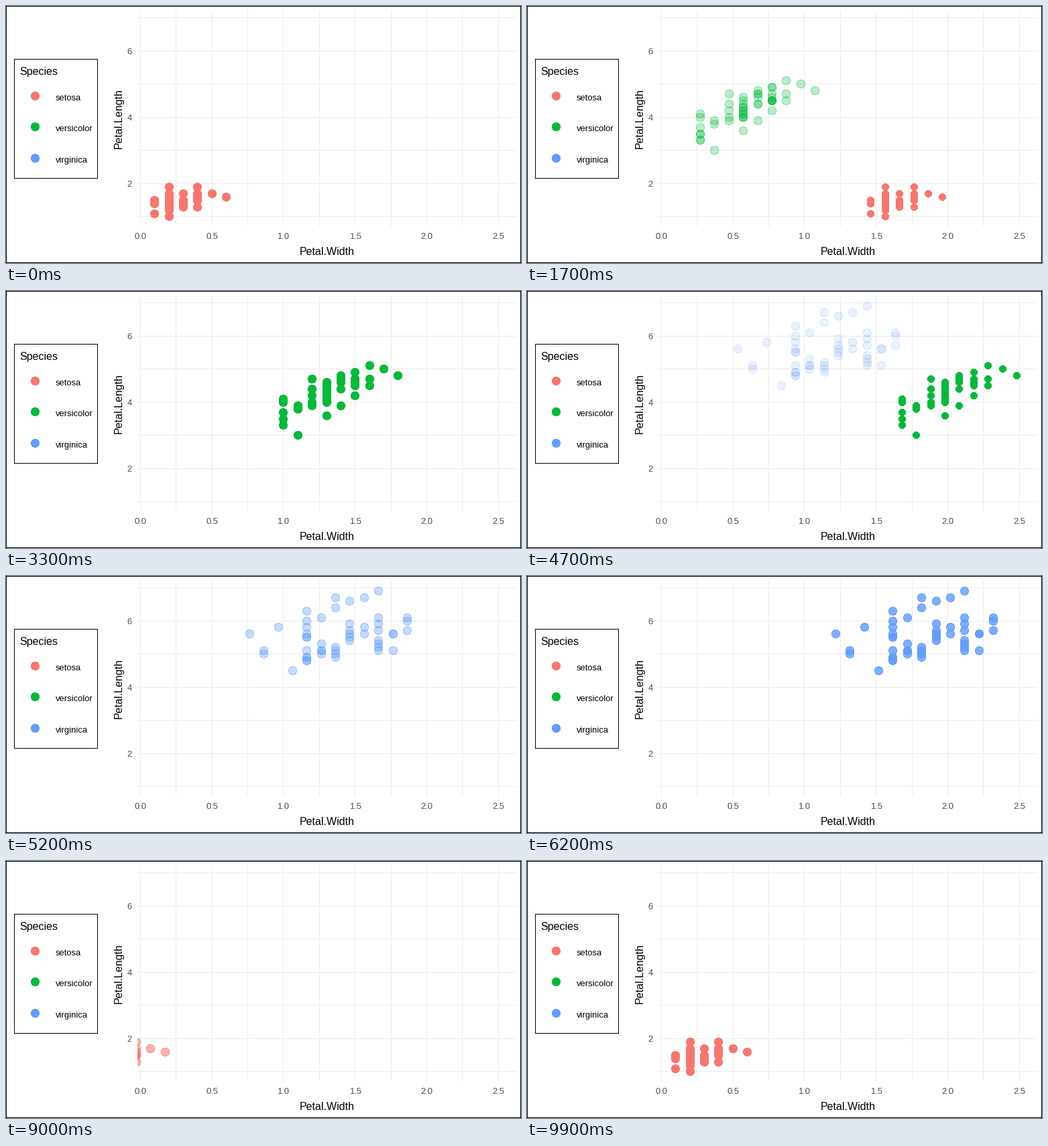
Animation of 768 by 384 pixels, one loop 10000 ms. Source, as a matplotlib script:

```python
import math

import matplotlib.pyplot as plt
import numpy as np
from matplotlib.animation import FuncAnimation
from matplotlib.collections import PathCollection
from matplotlib.patches import Rectangle
from matplotlib.path import Path
from matplotlib.transforms import IdentityTransform

WIDTH, HEIGHT = 768, 384
LEFT, TOP, RIGHT, BOTTOM = 196, 7, 761, 329
X_ZERO, X_UNIT = 200.4, 213.55
Y_TWO, Y_UNIT = 265.4, 49.59

# Petal widths mapped to petal lengths, both in millimetres.
SETOSA = {
    1: [11] + [14] * 2 + [15] * 2,
    2: [10] + [12] * 2 + [13] * 4 + [14] * 8 + [15] * 7 + [16] * 5 + [17, 19],
    3: [13] * 2 + [14] * 3 + [15, 17],
    4: [13] + [15] * 3 + [16, 17, 19],
    5: [17],
    6: [16],
}
VERSICOLOR = {
    10: [33] * 2 + [35] * 2 + [37, 40, 41],
    11: [30, 38, 39],
    12: [39, 40, 42, 44, 47],
    13: [36] + [40] * 3 + [41] * 2 + [42] * 2 + [43] * 2 + [44, 45, 46],
    14: [39] + [44] * 2 + [46] + [47] * 2 + [48],
    15: [42] + [45] * 5 + [46, 47] + [49] * 2,
    16: [45, 47, 51],
    17: [50],
    18: [48],
}
VIRGINICA = {
    14: [56],
    15: [50, 51],
    16: [58],
    17: [45],
    18: [48] * 2 + [49] * 2 + [51] + [55] * 2 + [56, 58, 60, 63],
    19: [50] + [51] * 2 + [53, 61],
    20: [49, 50, 51, 52, 64, 67],
    21: [54, 55, 56, 57, 59, 66],
    22: [56, 58, 67],
    23: [51, 52, 53, 54, 57, 59, 61, 69],
    24: [51] + [56] * 2,
    25: [57, 60, 61],
}
SPECIES = [
    ("setosa", "#F8766D", SETOSA),
    ("versicolor", "#00BA38", VERSICOLOR),
    ("virginica", "#619CFF", VIRGINICA),
]
# Start of the tween, first moving frame, last frame.
TRANSITIONS = [(11, 12, 33), (44, 46, 66), (78, 79, 99)]

plt.rcParams["font.family"] = "Liberation Sans"
fig = plt.figure(figsize=(WIDTH / 72, HEIGHT / 72), dpi=72, facecolor="white")
ax = fig.add_axes([0, 0, 1, 1])
ax.set(xlim=(0, WIDTH), ylim=(HEIGHT, 0))
ax.axis("off")


def to_x(value):
    return np.floor(X_ZERO + X_UNIT * value)


def to_y(value):
    return np.floor(Y_TWO - Y_UNIT * (value - 2))


def box(x, y, w, h, color):
    ax.add_patch(Rectangle((x, y), w, h, lw=0, color=color, antialiased=False))


def frame_box(x, y, w, h):
    box(x, y, w, h, "black")
    box(x + 1, y + 1, w - 2, h - 2, "white")


def label(x, y, text, size=13, color="black", **kwargs):
    ax.text(x, y, text, fontsize=size, color=color, va="baseline", **kwargs)


def spans_path(spans):
    """Path of one-pixel-high rows given as (row, left, right)."""
    vertices, codes = [], []
    for row, a, b in spans:
        vertices += [(a, -row), (b, -row), (b, -row - 1), (a, -row - 1), (a, -row)]
        codes += [Path.MOVETO] + [Path.LINETO] * 3 + [Path.CLOSEPOLY]
    return Path(vertices, codes)


def half_width(radius, row):
    return int(math.sqrt((radius + 0.5) ** 2 - row * row))


def disc_path(radius):
    rows = range(-radius, radius + 1)
    return spans_path([(r, -half_width(radius, r), half_width(radius, r) + 1)
                       for r in rows])


def ring_path(radius):
    spans = []
    for row in range(-radius, radius + 1):
        outer = half_width(radius, row)
        if abs(row) == radius:
            spans.append((row, -outer, outer + 1))
        else:
            inner = half_width(radius - 1, row)
            spans += [(row, -outer, -inner), (row, inner + 1, outer + 1)]
    return spans_path(spans)


class Cloud:
    """Crisp round points whose fill and outline share one opacity."""

    def __init__(self, color, x, y, clip=None):
        self.x, self.y = np.array(x), to_y(np.array(y))
        self.layers = []
        for make_path in (disc_path, ring_path):
            layer = PathCollection(
                [make_path(6)], offsets=np.zeros((1, 2)),
                offset_transform=ax.transData, transform=IdentityTransform(),
                facecolors=color, edgecolors="none", linewidths=0, zorder=3)
            layer.set_snap(False)
            ax.add_collection(layer, autolim=False)
            layer.set_clip_path(clip)
            self.layers.append((layer, make_path))

    def show(self, shift, alpha, scale):
        radius = max(1, int(5.69 * scale + 0.97))
        offsets = np.column_stack([to_x(self.x + shift), self.y])
        for layer, make_path in self.layers:
            layer.set_visible(True)
            layer.set_offsets(offsets)
            layer.set_paths([make_path(radius)])
            layer.set_alpha(alpha)

    def hide(self):
        for layer, _ in self.layers:
            layer.set_visible(False)


def draw_static():
    frame_box(0, 0, WIDTH, HEIGHT)
    for i in range(11):
        box(to_x(i / 4), TOP, 1, BOTTOM - TOP, "#EBEBEB")
    for value in range(1, 8):
        box(LEFT, to_y(value), RIGHT - LEFT, 1, "#EBEBEB")
    for i in range(6):
        label(to_x(i / 2) + 0.5, 348, f"{i / 2:.1f}", color="#4D4D4D", ha="center")
    for value in (2, 4, 6):
        label(188, to_y(value) + 5, str(value), color="#4D4D4D", ha="right")
    label(478.5, 372, "Petal.Width", 16, ha="center")
    label(173, 168, "Petal.Length", 16, rotation=90, ha="right",
          rotation_mode="default") if False else ax.text(
        173, 168, "Petal.Length", fontsize=16, rotation=90,
        rotation_mode="anchor", ha="center", va="baseline")

    frame_box(12, 79, 125, 179)
    label(20, 103, "Species", 16)
    for (name, color, _), y in zip(SPECIES, (134, 180, 227)):
        for make_path in (disc_path,):
            key = PathCollection(
                [make_path(6)], offsets=[(43, y)], offset_transform=ax.transData,
                transform=IdentityTransform(), facecolors=color,
                edgecolors="none", linewidths=0, zorder=3)
            key.set_snap(False)
            ax.add_collection(key, autolim=False)
        label(74, y + 7, name)


def states(frame):
    """Visible species as {index: (x shift, opacity, size)}."""
    for i, (start, first, end) in enumerate(TRANSITIONS):
        if frame < first:
            return {i: (0, 1, 1)}
        if frame < end:
            t = (frame - start) / (end - start)
            return {i: (5 * t, 1, 1 - t), (i + 1) % 3: (t - 1, t, 1)}
    return {0: (0, 1, 1)}


draw_static()
panel = Rectangle((LEFT, TOP), RIGHT - LEFT, BOTTOM - TOP, transform=ax.transData)
clouds = []
for _, color, petals in SPECIES:
    points = [(w / 10, length / 10) for w, lengths in petals.items()
              for length in lengths]
    clouds.append(Cloud(color, *zip(*points), clip=panel))


def update(frame):
    visible = states(frame)
    for i, cloud in enumerate(clouds):
        if i in visible:
            cloud.show(*visible[i])
        else:
            cloud.hide()
    return [layer for cloud in clouds for layer, _ in cloud.layers]


animation = FuncAnimation(fig, update, frames=100, interval=100,
                          repeat=True, repeat_delay=0, blit=False)
plt.show()
```
